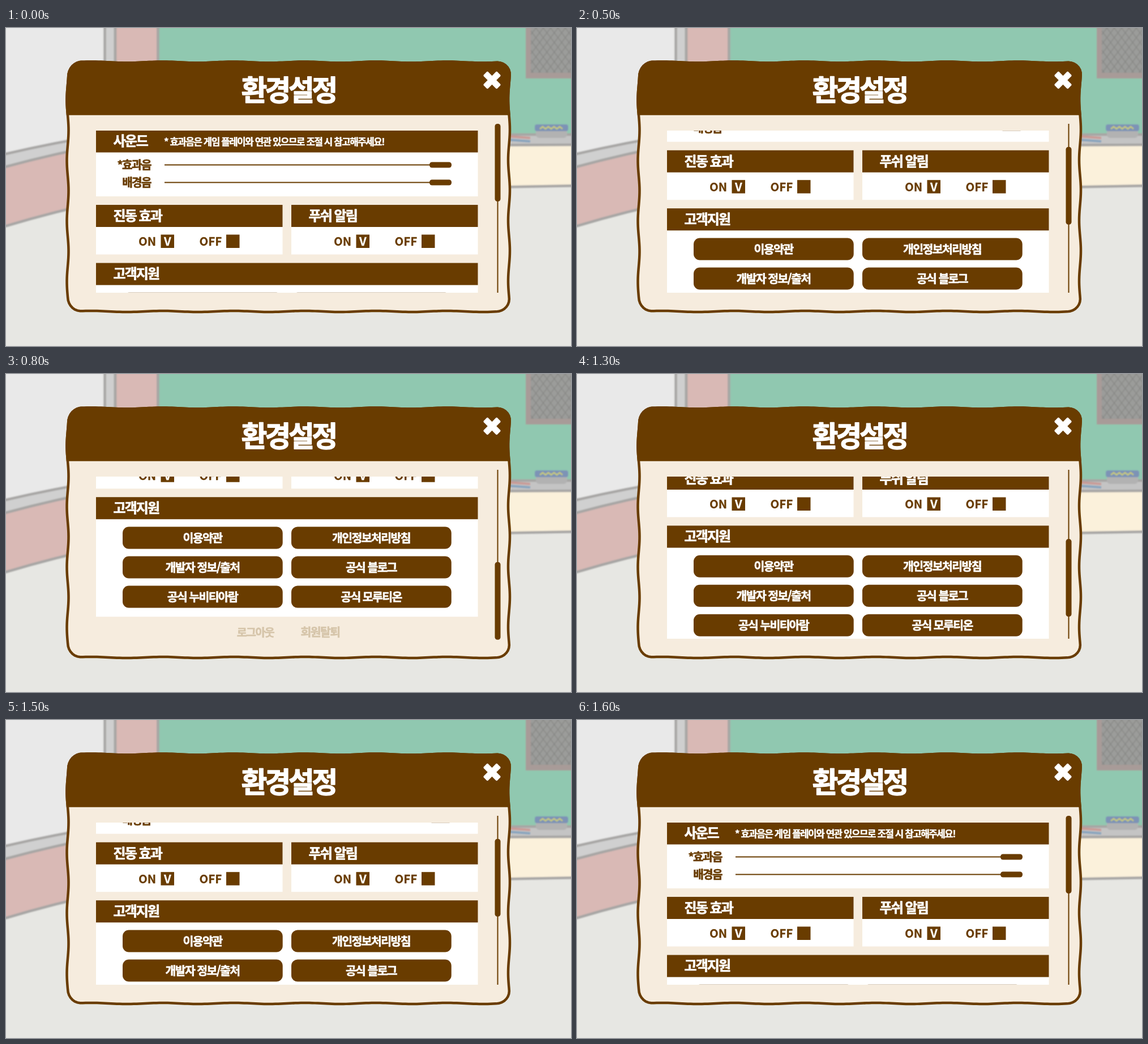
An HTML page that plays this animation: 998x561 px, repeating every 2.1 s.

```html
<!DOCTYPE html>
<html lang="ko">
<head>
<meta charset="utf-8">
<title>환경설정</title>
<style>
  html, body { margin: 0; width: 100%; height: 100%; overflow: hidden; }
  svg { display: block; }
  text { font-family: 'Noto Sans CJK KR', 'Noto Sans CJK', sans-serif; font-weight: 900; letter-spacing: -.08em; stroke-width: .03em; stroke-linejoin: round; white-space: pre; }
  .latin { font-weight: 700; letter-spacing: 0; stroke-width: .015em; }
  #room { stroke: #a7a6a4; stroke-width: 4.5; }
</style>
</head>
<body>
<svg width="998" height="561" viewBox="0 0 998 561">
  <defs>
    <clipPath id="view"><rect x="159" y="181" width="675" height="286"/></clipPath>
    <clipPath id="head"><rect x="100" y="50" width="800" height="103.7"/></clipPath>
    <filter id="soft" x="0" y="0" width="998" height="561" filterUnits="userSpaceOnUse"><feGaussianBlur stdDeviation="1"/></filter>
    <pattern id="mesh" width="13" height="17" patternUnits="userSpaceOnUse">
      <path d="M0 0L13 17M13 0L0 17" stroke="#858583" stroke-width="1.3"/>
    </pattern>
    <rect id="frame" x="109" y="60.5" width="779.5" height="439.5" rx="23"/>
  </defs>

  <rect width="998" height="561" fill="#e7e7e3"/>
  <g filter="url(#soft)"><g id="room"></g><g id="props"></g></g>

  <path class="panel" fill="#f6ecde" stroke="#693c00" stroke-width="4.5"/>
  <path class="panel" fill="#693c00" stroke="#693c00" stroke-width="4.5" clip-path="url(#head)"/>
  <g id="title"></g>
  <g clip-path="url(#view)"><g id="list"></g></g>
  <path d="M868.5 169V467" stroke="#693c00" stroke-width="2"/>
  <rect id="thumb" x="863.5" width="10" height="137" rx="4.5" fill="#693c00"/>
</svg>
<script>
const BROWN = '#693c00', WHITE = '#fff', FADED = '#d6c5aa';
const $ = id => document.getElementById(id);

const rect = (x, y, w, h, fill, rx = 0) =>
  `<rect x="${x}" y="${y}" width="${w}" height="${h}" rx="${rx}" fill="${fill}"/>`;

// cy is the vertical middle of the glyphs.
const text = (str, x, cy, size, fill, anchor = 'start', cls = '') =>
  `<text x="${x}" y="${cy + size * .37}" font-size="${size}" fill="${fill}" stroke="${fill}" text-anchor="${anchor}" class="${cls}">${str}</text>`;

const latin = (str, x, cy, fill, anchor) => text(str, x, cy, 20.5, fill, anchor, 'latin');

// Everything above a slightly bowed edge from (x0, y0) to (x1, y1).
const band = (x0, x1, y0, y1, fill) =>
  `<path d="M${x0} ${y0}Q${(x0 + x1) / 2} ${y0 * .4 + y1 * .6} ${x1} ${y1}V-9H${x0}Z" fill="${fill}"/>`;

// Room: overlapping bands, lowest first.
$('room').innerHTML =
  band(-9, 180, 352, 304, '#d9b9b5') + band(-9, 180, 247, 204, '#d0d0d0') + band(-9, 180, 224, 187, '#e9e9e9') +
  rect(174.5, -9, 18.5, 99, '#cfcfcf') + rect(193, -9, 75.5, 99, '#d9b9b5') +
  band(800, 1009, 282, 278, '#fbf1db') + band(800, 1009, 207, 206, '#c4c4c4') + band(268.5, 1009, 188, 188, '#90c8b0');

const chalk = (y, color) => `<path d="M885 ${y}l41 3" stroke="${color}" stroke-width="4"/>`;
$('props').innerHTML =
  rect(918, -9, 90, 98, '#a89b98') + rect(927, -9, 90, 88, '#9b9c9a') + rect(927, -9, 90, 88, 'url(#mesh)') +
  chalk(191, '#c99a95') + chalk(197, '#86a3bd') +
  rect(936, 176, 55, 18, '#b2b2b2', 6) + rect(934, 170, 59, 12, '#7d93b6', 4) +
  `<path d="M943 178${'l5 -4l5 4'.repeat(4)}" fill="none" stroke="#c9cb78" stroke-width="2.5"/>`;

// The panel is a rounded frame rippled by sine waves.
function ripple(frame) {
  const points = [];
  for (let s = 0; s < frame.getTotalLength(); s += 5) {
    const { x, y } = frame.getPointAtLength(s);
    points.push([x + 1.5 * Math.cos((y - 180) / 17), y - Math.cos((x - 275) / 20)]);
  }
  return 'M' + points.join('L') + 'Z';
}
const shape = ripple($('frame'));
document.querySelectorAll('.panel').forEach(p => p.setAttribute('d', shape));

const card = (title, x, y, w, h) =>
  rect(x, y, w, h, WHITE) + rect(x, y, w, 39, BROWN) + text(title, x + 30.5, y + 19, 24, WHITE);

const slider = (label, y) =>
  text(label, 256, y, 20.2, BROWN, 'end') +
  rect(280, y - 1, 500, 2, BROWN) + rect(748, y - 5, 39, 10, BROWN, 4.5);

const toggle = (title, x) =>
  card(title, x, 312, 329.5, 87.5) +
  latin('ON', x + 75, 376.5, BROWN) + rect(x + 114.5, 364.5, 23.5, 23.5, BROWN) +
  latin('V', x + 126.3, 376.5, WHITE, 'middle') +
  latin('OFF', x + 182.5, 376.5, BROWN) + rect(x + 230, 364.5, 23.5, 23.5, BROWN);

const button = (label, i) => {
  const x = i % 2 ? 504 : 206, y = 466.8 + (i >> 1) * 52;
  return rect(x, y, 282.7, 39, BROWN, 11) + text(label, x + 141, y + 19.5, 20.5, WHITE, 'middle');
};

const bar = angle => `<g transform="translate(858.5 92) rotate(${angle})">${rect(-17, -5.5, 34, 11, WHITE, 2)}</g>`;

$('title').innerHTML = text('환경설정', 499, 110, 49.5, WHITE, 'middle') + bar(45) + bar(-45);
$('list').innerHTML =
  card('사운드', 159, 180.5, 674.5, 116.5) +
  text('* 효과음은 게임 플레이와 연관 있으므로 조절 시 참고해주세요!', 279, 201, 16.7, WHITE) +
  slider('*효과음', 241.5) + slider('배경음', 272.5) +
  toggle('진동 효과', 159) + toggle('푸쉬 알림', 504) +
  card('고객지원', 159, 414.5, 674.5, 211) +
  ['이용약관', '개인정보처리방침', '개발자 정보/출처', '공식 블로그', '공식 누비티아람', '공식 모루티온'].map(button).join('') +
  text('로그아웃', 440.5, 653, 19.5, FADED, 'middle') +
  text('회원탈퇴', 555, 653, 20.5, FADED, 'middle');

// The thumb moves evenly; the list jumps to its own offset at each step.
const offsets = [0, -96.3, 4, -147, -197.3];

function draw() {
  const t = performance.now() % 2100;
  const down = Math.floor((t - 400) / 100), up = Math.ceil((1600 - t) / 100);
  const step = Math.max(0, Math.min(4, down, up));
  $('list').setAttribute('transform', `translate(0 ${offsets[step]})`);
  $('thumb').setAttribute('y', 169 + step * 40.7);
  requestAnimationFrame(draw);
}
draw();
</script>
</body>
</html>
```
